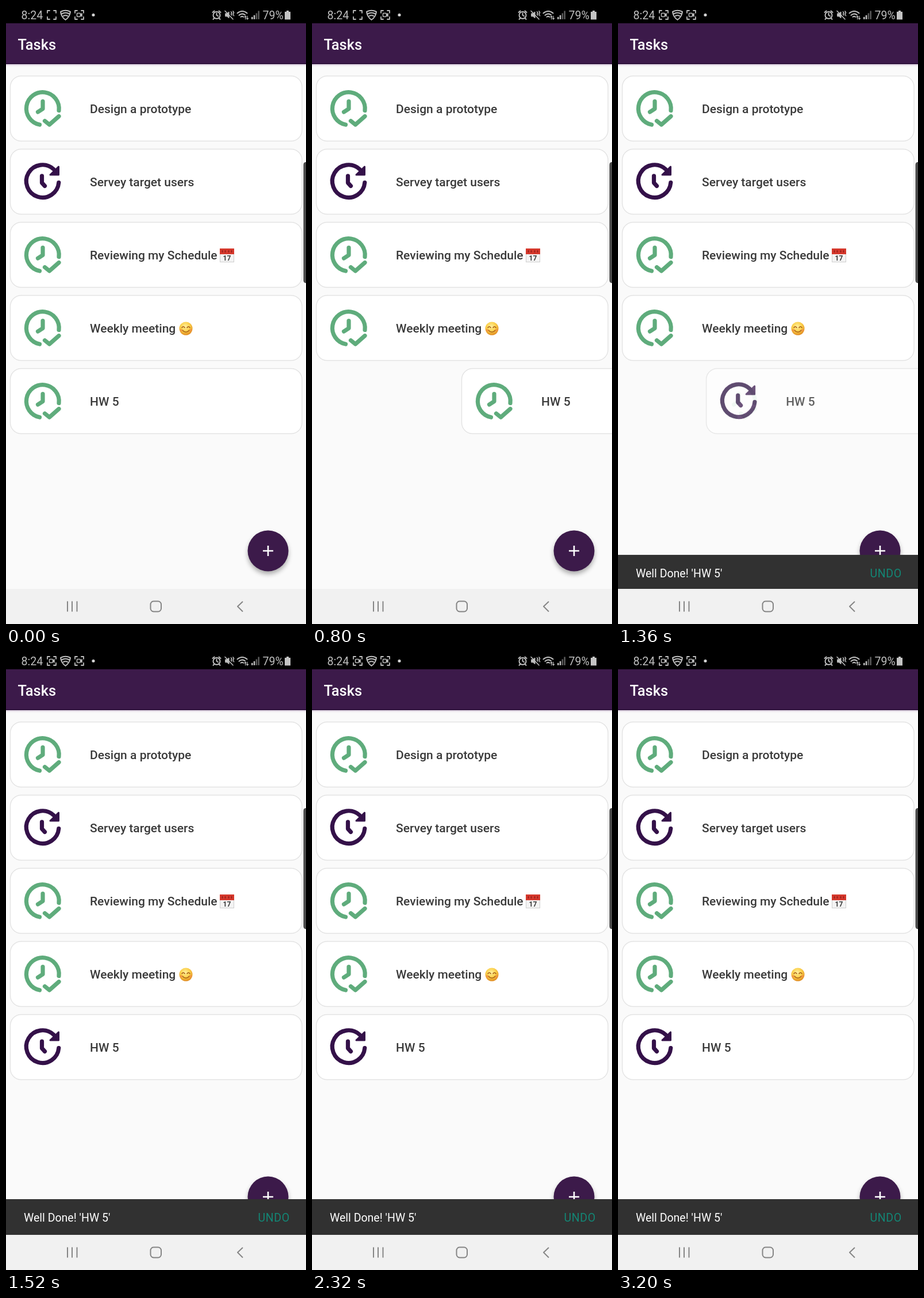
Animation of 522x1073 px, one loop 3280 ms. Source, as an HTML page:

```html
<!DOCTYPE html>
<html lang="en">
<head>
<meta charset="utf-8">
<title>Tasks</title>
<style>
  html, body { margin: 0; width: 100%; height: 100%; overflow: hidden; background: #fafafa; }
  svg { display: block; width: 100vw; height: 100vh; }
  text { font-family: Roboto, "Noto Sans", sans-serif; }
  .label { font-size: 21px; font-weight: 500; fill: #3a3a3a; }
  .status text { font-size: 19.6px; fill: #bebebe; }
  .line { fill: none; stroke-linecap: round; stroke-linejoin: round; }
</style>
</head>
<body>
<svg viewBox="0 0 522 1073">
  <defs>
    <radialGradient id="smile" cx=".45" cy=".35" r=".65">
      <stop offset="0" stop-color="#fff0a0"/>
      <stop offset=".55" stop-color="#fbd04a"/>
      <stop offset="1" stop-color="#e08a1e"/>
    </radialGradient>
    <linearGradient id="headerShade" x2="0" y2="1">
      <stop offset="0" stop-color="#d9cddd"/>
      <stop offset="1" stop-color="#fafafa"/>
    </linearGradient>
    <filter id="soft" x="-30%" y="-30%" width="160%" height="160%">
      <feGaussianBlur stdDeviation="4"/>
    </filter>
    <g id="box">
      <rect x="7.5" y=".5" width="507.5" height="113" rx="19" fill="#fff" stroke="#e3e3e3" stroke-width="1.4"/>
    </g>
    <g id="done" class="line" stroke="#5fac7c" stroke-width="7.2">
      <path d="M92 60.500A28.400 28.400 0 1 0 58.500 85"/>
      <path d="M64 44.500V57.500L55.500 63"/>
      <path d="M67.500 78.500L75.500 85L92 70.500"/>
    </g>
    <g id="pending" class="line" stroke="#341149" stroke-width="7.2">
      <path d="M91.800 58.500A28.300 28.300 0 1 1 83 35.500"/>
      <path d="M62.500 47V59L67.500 64.500"/>
      <path d="M91.500 31V45H77Z" fill="#341149" stroke-width="3"/>
    </g>
    <g id="brackets" class="line" stroke="#bebebe" stroke-width="1.8">
      <path d="M0 4V0H4M11 0H15V4M15 11V15H11M4 15H0V11"/>
    </g>
    <g id="camera" class="line" stroke="#bebebe" stroke-width="1.5">
      <rect x="3.500" y="4.500" width="6" height="6" rx="1"/>
      <path d="M9.500 7.500L12 5V10Z" fill="#bebebe"/>
    </g>
  </defs>

  <rect width="522" height="1073" fill="#fafafa"/>
  <rect y="101" width="522" height="4" fill="url(#headerShade)"/>
  <rect y="30" width="522" height="71" fill="#3c1a4a"/>
  <rect y="99" width="522" height="2" fill="#2f123c"/>
  <text x="20.500" y="76" font-size="25.4" font-weight="500" fill="#fff">Tasks</text>

  <g id="cards"></g>

  <g transform="translate(384.500 433)">
    <rect x="-12" y="-11" width="24" height="22.500" fill="#f4f4f4" stroke="#cfcfcf"/>
    <rect x="-12.500" y="-12" width="25" height="10" fill="#d5382c"/>
    <path d="M-8 -9V-5M-3 -9V-5M3 -9V-5M8 -9V-5" stroke="#8e1d18" stroke-width="1.500"/>
    <text y="8.500" font-size="12" font-weight="700" text-anchor="middle" fill="#3a3a3a">17</text>
  </g>
  <g transform="translate(313 560)">
    <circle r="11.500" fill="url(#smile)"/>
    <path class="line" d="M-7 -1.500Q-4.500 -5 -2 -1.500M2 -1.500Q4.500 -5 7 -1.500M-6 3Q0 9 6 3" stroke="#a45a16" stroke-width="1.500"/>
    <circle cx="-8" cy="3" r="2.200" fill="#ef8b45" opacity=".7"/>
    <circle cx="8" cy="3" r="2.200" fill="#ef8b45" opacity=".7"/>
  </g>

  <path d="M522 271Q517.500 271 517.500 276V476Q517.500 481 522 481Z" fill="#4b4b4b"/>

  <circle cx="456" cy="951" r="35" opacity=".34" filter="url(#soft)"/>
  <circle cx="456" cy="946" r="35.500" fill="#3c1a4a"/>
  <path d="M447 946H465M456 937V955" stroke="#fff" stroke-width="2.600"/>

  <g id="snackbar">
    <rect y="950" width="522" height="63" fill="#313131"/>
    <text x="31" y="989" font-size="19.5" fill="#fff">Well Done! 'HW 5'</text>
    <text x="438.500" y="989" font-size="19.5" letter-spacing=".6" fill="#138675">UNDO</text>
  </g>

  <rect y="1012" width="522" height="61" fill="#f1f1f1"/>
  <g class="line" stroke="#858585" stroke-width="2" style="stroke-linecap:butt">
    <path d="M107 1033.500V1051.500M115 1033.500V1051.500M123.500 1033.500V1051.500"/>
    <rect x="251.500" y="1033.500" width="18.500" height="18" rx="5.500"/>
    <path d="M412 1034L403 1042.500L412 1051.500"/>
  </g>

  <rect width="522" height="30" fill="#000"/>
  <g class="status">
    <text x="26.500" y="23">8:24</text>
    <use href="#brackets" x="72" y="8"/>
    <use id="blink" href="#camera" x="72" y="8"/>
    <g class="line" stroke="#bebebe" stroke-width="2">
      <path d="M95 10Q103.500 5.500 112 10Q111 19 103.500 24Q96 19 95 10Z"/>
      <path d="M97 13.500Q103.500 10 110 13.500M99.500 17.500Q103.500 15 107.500 17.500"/>
    </g>
    <use href="#brackets" x="120" y="8"/>
    <use href="#camera" x="120" y="8"/>
    <circle cx="152" cy="15.500" r="2.600" fill="#d2d2d2"/>

    <g class="line" stroke="#bebebe" stroke-width="2">
      <circle cx="366.500" cy="16" r="6"/>
      <path d="M366.500 12.500V16L369 17.500M359.500 11L362.500 8.500M373.500 11L370.500 8.500M362 21.500L360.500 23M371 21.500L372.500 23"/>
      <path d="M382 13H384.500L388 10V21L384.500 18H382Z" fill="#bebebe" stroke-width="1"/>
      <path d="M381 8.500L395 23M391.500 10L393 12L391.500 14L393 16M395 9L396.500 11.500L395 14L396.500 17" stroke-width="1.600"/>
      <path d="M402.500 12.500Q411 5.500 419.500 12.500M405.500 16Q411 11.500 416 15.500M408.500 19Q411 17 413 19"/>
      <path d="M416.500 23V17.500M415 19L416.500 17.500L418 19M420 17.500V23M418.500 21.500L420 23L421.500 21.500" stroke-width="1.200"/>
    </g>
    <path d="M427 19H429.500V23H427ZM430.800 16H433.300V23H430.800Z" fill="#bebebe"/>
    <path d="M434.600 12.500H437.100V23H434.600ZM438.400 8.500H440.900V23H438.400Z" fill="#5c5c5c"/>
    <text x="446.500" y="23">79%</text>
    <path d="M488 8H492V10H495V23.500H485V10H488Z" fill="#c4c4c4"/>
  </g>
</svg>
<script>
  const LOOP = 3280, STEP = 80, AWAY = 509;
  const RETURN_AT = 1200, SETTLE = 250;
  const drag = [[400, 0], [480, 5], [560, 21], [640, 85], [720, 167], [800, 253],
                [880, 333], [960, 403], [1040, 458], [1120, 500], [1200, AWAY + 8]];
  const get = id => document.getElementById(id);
  const clamp = v => Math.max(0, Math.min(1, v));
  const smooth = p => (1 - Math.cos(Math.PI * p)) / 2;
  const easeOut = p => 1 - (1 - p) ** 3;

  function addCard(label, icon, row) {
    const card = document.createElementNS("http://www.w3.org/2000/svg", "g");
    card.innerHTML = `<use href="#box"/><use href="#${icon}"/><text class="label" x="146" y="64.500">${label}</text>`;
    get("cards").append(card);
    const place = (x, alpha) => {
      card.setAttribute("transform", `translate(${x} ${121 + row * 127})`);
      card.setAttribute("opacity", alpha);
    };
    place(0, 1);
    return place;
  }

  ["Design a prototype", "Servey target users", "Reviewing my Schedule", "Weekly meeting"]
    .forEach((label, row) => addCard(label, row === 1 ? "pending" : "done", row));
  const placeOld = addCard("HW 5", "done", 4);
  const placeNew = addCard("HW 5", "pending", 4);

  function dragOffset(t) {
    const i = drag.findIndex(([time]) => time > t);
    if (i === 0) return 0;
    if (i < 0) return AWAY;
    const [t0, x0] = drag[i - 1], [t1, x1] = drag[i];
    return x0 + (x1 - x0) * (t - t0) / (t1 - t0);
  }

  function render(t) {
    const p = clamp((t - RETURN_AT) / SETTLE);
    const x = t < RETURN_AT ? dragOffset(t) : AWAY * (1 - smooth(p));
    placeOld(x, 1 - smooth(p));
    placeNew(x, smooth(p));
    get("snackbar").setAttribute("transform", `translate(0 ${63 * (1 - easeOut(p))})`);
    const beat = t % 1000;
    get("blink").setAttribute("opacity", beat >= 160 && beat < 640 ? 1 : 0);
  }

  let start;
  function tick(now) {
    start ??= now;
    const t = (now - start) % LOOP;
    render(Math.floor(t / STEP) * STEP);
    requestAnimationFrame(tick);
  }
  render(0);
  requestAnimationFrame(tick);
</script>
</body>
</html>
```
